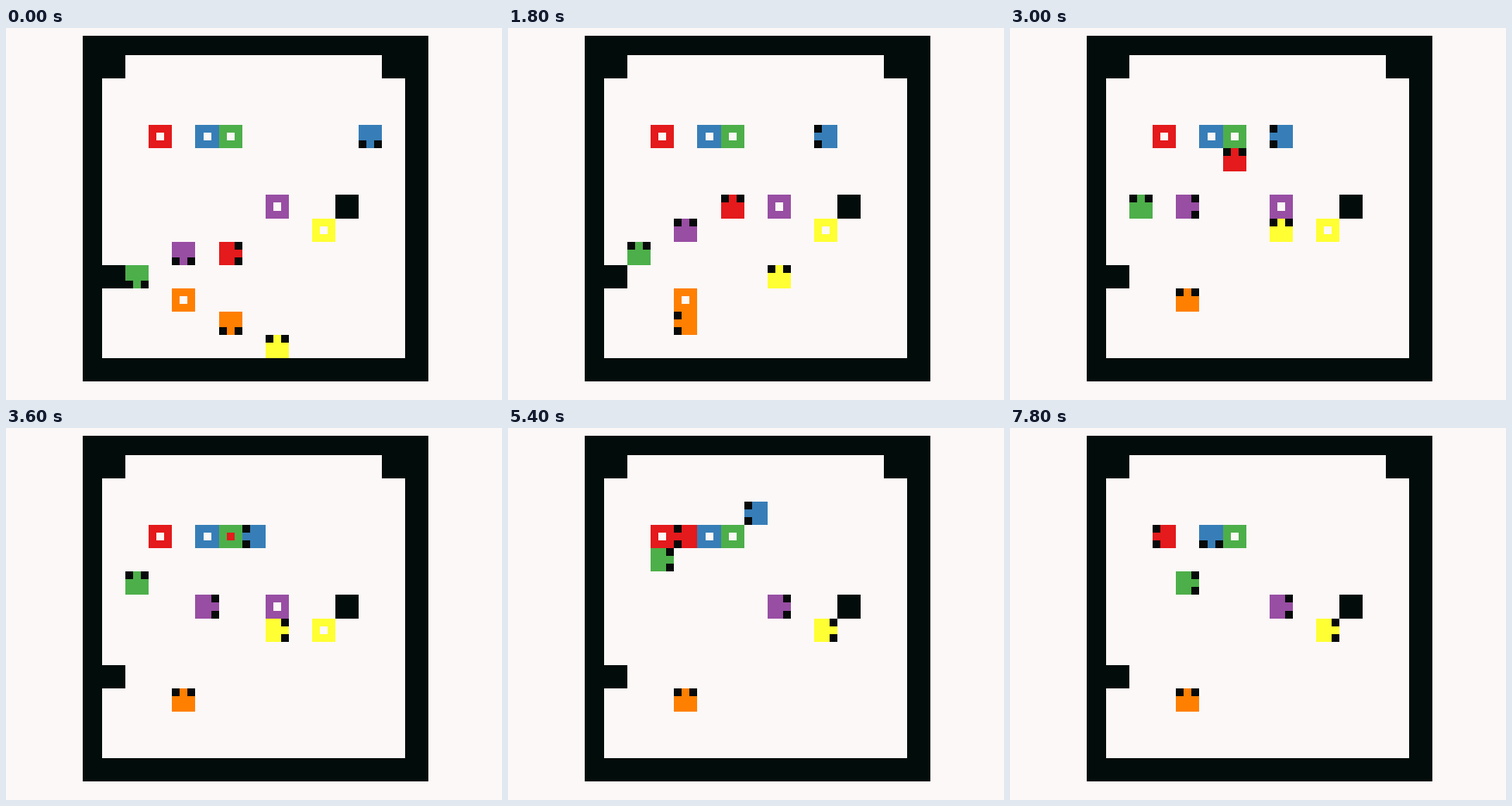
Animation, 640 px wide and 480 px high, one loop 8000 ms. Source, as an HTML page with a canvas:

```html
<!DOCTYPE html>
<html lang="en">
<head>
<meta charset="utf-8">
<title>Grid robots</title>
<style>
  html, body { margin: 0; width: 100%; height: 100%; overflow: hidden; background: #fcf8f7; }
  canvas { display: block; }
</style>
</head>
<body>
<canvas id="stage" width="640" height="480"></canvas>
<script>
const ctx = document.getElementById('stage').getContext('2d');
const FLOOR = '#fcf8f7', WALL = '#020c0a', EYE = '#070a0a';
const LOOP = 8000, STEP = 600;

// The board is 89 units wide: walls of 5 and 6 around 13 cells of 6 units.
const UNIT = 446 / 89, LEFT = 99.17, TOP = 10;
const px = u => Math.round(LEFT + u * UNIT);
const py = u => Math.round(TOP + u * UNIT);
const cell = c => 5 + c * 6;

const DIRS = { u: [0, -1], r: [1, 0], d: [0, 1], l: [-1, 0] };
// Eye offsets inside a cell, by heading
const EYES = {
  u: [[0, 0], [4, 0]], d: [[0, 4], [4, 4]],
  l: [[0, 0], [0, 4]], r: [[4, 0], [4, 4]]
};
const BLOCKS = [[0, 0], [12, 0], [0, 9], [10, 6]];

// Moves: f = forward, u/r/d/l = turn to that heading, . = wait
const ROBOTS = [
  { color: '#e41a1c', goal: [2, 3], start: [5, 8, 'r'],  moves: 'uffffflff..f.' },
  { color: '#377eb8', goal: [4, 3], start: [11, 3, 'd'], moves: 'lfffffuflffdf' },
  { color: '#4daf4a', goal: [5, 3], start: [1, 9, 'd'],  moves: 'rufffffrfdfrf' },
  { color: '#984ea3', goal: [7, 6], start: [3, 8, 'd'],  moves: 'ruffrffff' },
  { color: '#ff7f00', goal: [3, 10], start: [5, 11, 'd'], moves: 'lffuf' },
  { color: '#ffff33', goal: [9, 7], start: [7, 12, 'u'], moves: 'fffffrff' }
];

function box(color, x, y, w, h = w) {
  ctx.fillStyle = color;
  ctx.fillRect(px(x), py(y), px(x + w) - px(x), py(y + h) - py(y));
}

function drawGoal({ color, goal }) {
  const x = cell(goal[0]), y = cell(goal[1]);
  box(color, x, y, 6, 2);
  box(color, x, y + 4, 6, 2);
  box(color, x, y + 2, 2);
  box(color, x + 4, y + 2, 2);
}

function poseAt({ start, moves }, step) {
  let [x, y, dir] = start;
  for (const m of moves.slice(0, step)) {
    if (m === 'f') {
      x += DIRS[dir][0];
      y += DIRS[dir][1];
    } else if (m !== '.') {
      dir = m;
    }
  }
  return [x, y, dir];
}

function drawRobot(robot, step) {
  const [cx, cy, dir] = poseAt(robot, step);
  const x = cell(cx), y = cell(cy);
  box(robot.color, x, y, 6);
  for (const [dx, dy] of EYES[dir]) box(EYE, x + dx, y + dy, 2);
}

function draw(step) {
  ctx.fillStyle = FLOOR;
  ctx.fillRect(0, 0, 640, 480);
  box(WALL, 0, 0, 89);
  box(FLOOR, 5, 5, 78);
  for (const [x, y] of BLOCKS) box(WALL, cell(x), cell(y), 6);
  for (const robot of ROBOTS) {
    drawGoal(robot);
    drawRobot(robot, step);
  }
}

const t0 = performance.now();
let shown = 0;
function tick() {
  const step = Math.floor(((performance.now() - t0) % LOOP) / STEP);
  if (step !== shown) draw(shown = step);
  requestAnimationFrame(tick);
}
draw(0);
requestAnimationFrame(tick);
</script>
</body>
</html>
```
